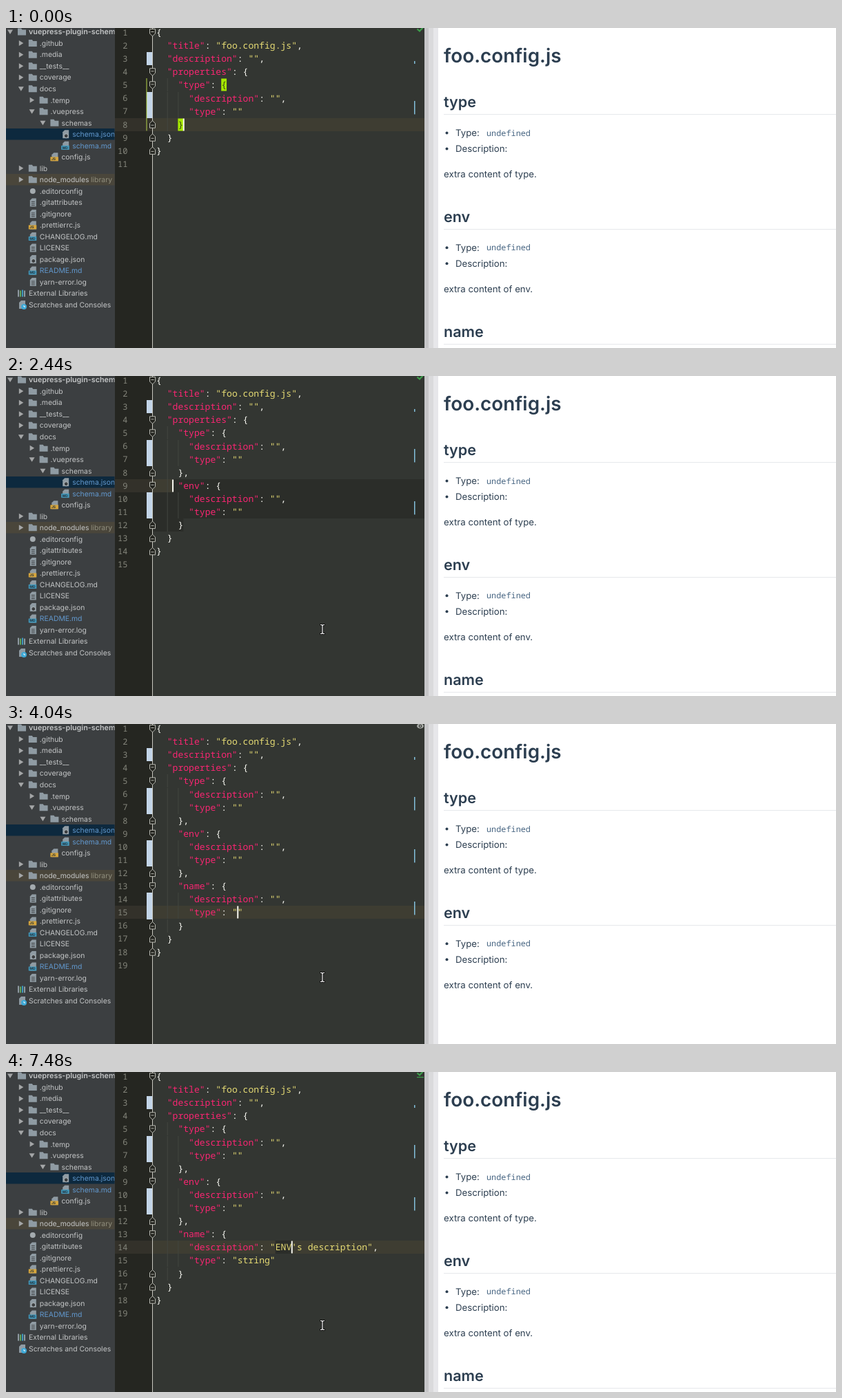
An HTML page for the animation above (8000 ms loop, 1204 by 465 pixels).

```html
<!DOCTYPE html>
<html lang="en">
<head>
<meta charset="utf-8">
<title>Schema editing</title>
<style>
html, body { margin: 0; width: 100%; height: 100%; overflow: hidden; background: #fff; }
svg { display: block; width: 1204px; height: 465px; }
text { white-space: pre; text-rendering: geometricPrecision; }
.tree { font: 10.4px Inter, sans-serif; fill: #c3c5c6; }
.root { font-size: 10.8px; font-weight: 600; }
.code { font: 13.08px "Noto Sans Mono", monospace; }
.num { font: 12px "Noto Sans Mono", monospace; fill: #85867c; text-anchor: end; }
.badge { font: 700 5px Inter, sans-serif; fill: #24323b; }
.page { font: 13.25px Inter, sans-serif; fill: #2c3e50; }
.page .h1 { font-size: 27.9px; font-weight: 600; }
.page .h2 { font-size: 21.6px; font-weight: 600; }
.page .mono { font: 11.85px "Noto Sans Mono", monospace; fill: #476582; }
</style>
</head>
<body>
<svg viewBox="0 0 1204 465">
  <defs>
    <clipPath id="side"><rect width="157.5" height="465"/></clipPath>
    <path id="foldOpen" d="M-4-5H4V1.5L0 5.5L-4 1.5ZM-2-1H2"/>
    <path id="foldClose" d="M-4 5H4V-1.5L0-5.5L-4-1.5ZM-2 1H2"/>
    <path id="beamPath" d="M-2.5-6.5Q0-6.5 0-5Q0-6.5 2.5-6.5M0-5V5M-2.5 6.5Q0 6.5 0 5Q0 6.5 2.5 6.5"/>
  </defs>
  <rect width="158" height="465" fill="#3c3f41"/>
  <g id="tree" class="tree" clip-path="url(#side)"></g>
  <rect x="158" width="54" height="465" fill="#252621"/>
  <rect x="212" width="395" height="465" fill="#333632"/>
  <g id="editor"></g>
  <rect x="607" width="6" height="465" fill="#c6c6c8"/>
  <rect x="613" width="7" height="465" fill="#dadadc"/>
  <rect x="620" width="7" height="465" fill="#e7e7ea"/>
  <g id="page" class="page"></g>
  <g id="pointer">
    <g id="beam" fill="none" stroke-linecap="square">
      <use href="#beamPath" stroke="#111" stroke-width="3"/>
      <use href="#beamPath" stroke="#fff" stroke-width="1.2"/>
    </g>
    <path id="arrow" d="M0 0V13L3 10.3L5 15L7.3 14L5.3 9.4H9.3Z" fill="#111" stroke="#fff"/>
  </g>
</svg>
<script>
const $ = id => document.getElementById(id);
const rect = (x, y, w, h, fill) => `<rect x="${x}" y="${y}" width="${w}" height="${h}" fill="${fill}"/>`;
const path = (d, stroke, width = 1, fill = 'none') =>
  `<path d="${d}" stroke="${stroke}" stroke-width="${width}" fill="${fill}"/>`;
const text = (x, y, str, cls = '', fill = '') =>
  `<text x="${x}" y="${y}" class="${cls}"${fill && ` style="fill:${fill}"`}>${str}</text>`;

// Project tree: depth, icon, label
const BLUE = '#6299cf';
const TREE = [
  [0, 'open', 'vuepress-plugin-schema'], [1, 'dir', '.github'], [1, 'dir', '.media'],
  [1, 'dir', '__tests__'], [1, 'dir', 'coverage'], [1, 'open', 'docs'], [2, 'dir', '.temp'],
  [2, 'open', '.vuepress'], [3, 'open', 'schemas'], [4, 'json', 'schema.json', BLUE],
  [4, 'md', 'schema.md', BLUE], [3, 'js', 'config.js'], [1, 'dir', 'lib'],
  [1, 'dir', 'node_modules'], [1, 'dot', '.editorconfig'], [1, 'file', '.gitattributes'],
  [1, 'file', '.gitignore'], [1, 'js', '.prettierrc.js'], [1, 'md', 'CHANGELOG.md'],
  [1, 'file', 'LICENSE'], [1, 'json', 'package.json'], [1, 'md', 'README.md', BLUE],
  [1, 'file', 'yarn-error.log'], [0, 'libs', 'External Libraries'],
  [0, 'scratch', 'Scratches and Consoles']
];

function treeIcon(kind, x, y) {
  const grey = '#8f9ba3';
  const sheet = path(`M${x + 5} ${y - 6}H${x + 11}V${y + 6}H${x + 2}V${y - 3}Z`, 'none', 0, grey);
  const lines = path(`M${x + 4} ${y - 1}H${x + 9}M${x + 4} ${y + 1.5}H${x + 9}M${x + 4} ${y + 4}H${x + 9}`, '#3c3f41');
  const badge = (label, fill) => sheet + rect(x, y, 11.5, 6, fill) + text(x + 1.5, y + 4.9, label, 'badge');
  switch (kind) {
    case 'dir':
    case 'open': return path(`M${x} ${y - 5}H${x + 5}L${x + 6.5} ${y - 3}H${x + 12}V${y + 5}H${x}Z`, 'none', 0, grey);
    case 'js': return badge('JS', '#d6a53c');
    case 'md': return badge('MD', '#4199bd');
    case 'json': return sheet + `<circle cx="${x + 7}" cy="${y + 2.5}" r="3" fill="#3c3f41" stroke="#b4bcc1"/>`;
    case 'dot': return `<circle cx="${x + 6}" cy="${y}" r="4" fill="#a4abaf"/>`;
    case 'libs': return [grey, '#62a65c', '#4199bd', grey]
      .map((c, i) => rect(x + i * 3, y - 5 + i % 2, 2, 10 - i % 2, c)).join('');
    case 'scratch': return sheet + `<circle cx="${x + 9}" cy="${y + 3}" r="4" fill="#3fa9d6"/>` +
      path(`M${x + 9} ${y + 1}V${y + 3}H${x + 11}`, '#fff');
    default: return sheet + lines;
  }
}

function drawTree() {
  let out = rect(0, 146, 158, 16.5, '#0d293e') + rect(0, 212, 158, 16.5, '#4a463b');
  TREE.forEach(([depth, kind, label, fill], i) => {
    const x = 17 + depth * 15.8, y = 5.6 + i * 16.52;
    if (kind === 'open') out += path(`M${x - 15} ${y - 3}h8l-4 6.5Z`, 'none', 0, '#a4a6a7');
    if (kind === 'dir') out += path(`M${x - 14} ${y - 4}v8l6.5-4Z`, 'none', 0, '#a4a6a7');
    out += treeIcon(kind, x, y) + text(x + 16, y + 3.8, label, i ? '' : 'root', fill);
  });
  return out + text(123, 224.2, 'library', '', '#918f7e');
}

function drawPage(named) {
  let out = text(635, 50, 'foo.config.js', 'h1');
  ['type', 'env', 'name'].slice(0, named ? 3 : 2).forEach((name, i) => {
    const y = i * 166.8;
    out += text(635, 115 + y, name, 'h2') + rect(635, Math.round(125 + y), 569, 1, '#e6e8eb');
    ['Type:', 'Description:'].forEach((label, j) => {
      out += `<circle cx="639.5" cy="${152.5 + y + j * 23}" r="2"/>` + text(652, 157 + y + j * 23, label);
    });
    out += text(697, 156.5 + y, 'undefined', 'mono') + text(635, 217 + y, `extra content of ${name}.`);
  });
  return out;
}

// Document builders
const block = (name, desc = '', type = '') =>
  [`    "${name}": {`, `      "description": "${desc}",`, `      "type": "${type}"`, '    }'];
const doc = (...body) => ['{', '  "title": "foo.config.js",', '  "description": "",', '  "properties": {',
  ...body.flat(), '  }', '}', ''];
const comma = lines => [...lines.slice(0, -1), lines.at(-1) + ','];
const TYPE = block('type'), ENV = block('env');
const one = doc(TYPE), two = doc(comma(TYPE), ENV);
const third = (desc, type) => doc(comma(TYPE), comma(ENV), block('name', desc, type));
const empty = third(), typed = third('', 'string'), full = third("ENV's description", 'string');

const STEPS = [
  { at: 0, lines: one, caret: [8, 5], pair: [5, 12, 8, 4], mark: 'ok', named: true },
  { at: 630, blink: true },
  { at: 1070, caret: [11, 0], pair: null, blink: false },
  { at: 1450, caret: [8, 5], pair: [5, 12, 8, 4] },
  { at: 1810, lines: doc(comma(TYPE)), caret: [8, 6], pair: null, mark: 'eye' },
  { at: 1900, lines: doc(comma(TYPE), '    '), caret: [9, 4] },
  { at: 2140, lines: doc(comma(TYPE), '   '), caret: [9, 3] },
  { at: 2230, lines: two, sel: [9, 3, 12, 5], unfolded: 9 },
  { at: 2440, mark: 'ok', unfolded: 0 },
  { at: 3270, caret: [12, 5], sel: null, pair: [9, 11, 12, 4] },
  { at: 3390, lines: doc(comma(TYPE), comma(ENV)), caret: [12, 6], pair: null, named: false },
  { at: 3600, lines: doc(comma(TYPE), comma(ENV), '    '), caret: [13, 4], mark: 'error' },
  { at: 3800, lines: empty, caret: [13, 3], sel: [13, 3, 16, 5], mark: 'eye', unfolded: 13 },
  { at: 3920, caret: [15, 15], sel: null },
  { at: 4040, unfolded: 0 },
  { at: 4160, mark: 'ok' },
  { at: 4430, lines: typed, caret: [15, 21], sel: [15, 15, 15, 21], mark: 'eye', stale: 15 },
  { at: 4550, stale: 0 },
  { at: 4790, mark: 'ok' },
  { at: 5840, blink: true },
  { at: 6140, caret: [14, 22], sel: null, blink: false },
  { at: 6440, lines: third('description', 'string'), mark: 'eye' },
  { at: 6710, lines: third('s description', 'string') },
  { at: 6820, lines: third("'s description", 'string') },
  { at: 7120, lines: full, caret: [14, 25], sel: [14, 22, 14, 25], stale: 14 },
  { at: 7240, stale: 0, named: true },
  { at: 7480, mark: 'done' }
];
// Each step inherits what it does not change
for (let i = 1; i < STEPS.length; i++) STEPS[i] = { ...STEPS[i - 1], ...STEPS[i] };

const CW = 7.85, LH = 19.1;
const colX = col => 218 + col * CW;
const rowY = row => 6.5 + (row - 1) * LH;
const topY = row => Math.round(rowY(row) - 9.5);
const isChanged = line => /description": "(?!ENV)|type": ""|^ +$/.test(line);

function drawLine(line, row) {
  const out = [];
  for (const m of line.matchAll(/"[^"]*"(:)?|[^\s"]/g)) {
    const str = m[1] ? m[0].slice(0, -1) : m[0];
    const fill = m[1] ? '#f92672' : str[0] === '"' ? '#e6db74' : '#f8f8f2';
    out.push(text(colX(m.index), rowY(row) + 4.5, str, 'code', fill));
    if (m[1]) out.push(text(colX(m.index + str.length), rowY(row) + 4.5, ':', 'code', '#f8f8f2'));
  }
  return out.join('');
}

function drawMark(mark) {
  if (mark === 'eye') return `<ellipse cx="601" cy="3" rx="5" ry="3.5" fill="#a9aca8"/>
    <circle cx="601" cy="3" r="2.3" fill="#333632"/><circle cx="601" cy="3" r="1" fill="#ccc"/>`;
  if (mark === 'error') return '<circle cx="601" cy="2.5" r="5" fill="#e6194f"/>' +
    rect(600.4, -1, 1.2, 4, '#fff') + rect(600.4, 4, 1.2, 1.2, '#fff') +
    rect(595, 220.5, 12, 1.5, '#f0245f') + path('M258 224l2-1.5l2 1.5l2-1.5l2 1.5', '#f0245f');
  return path('M596.5 1.5L600 4.5L606-2', '#3d9f4b', 2.2) +
    (mark === 'done' ? rect(596, 7, 10, 1.2, '#3d9f4b') : '');
}

function drawEditor({ lines, caret, pair, sel, mark, blink, unfolded, stale }) {
  const [row, col] = caret;
  let out = rect(158, topY(row), 54, 19, '#33312a') + rect(213, topY(row), 394, 19, '#3e3d32');
  if (sel) {
    const [r1, c1, r2, c2] = sel;
    for (let r = r1; r <= r2; r++) {
      const x = r === r1 ? colX(c1) : 213;
      out += rect(x, topY(r), (r === r2 ? colX(c2) : 607) - x, topY(r + 1) - topY(r), '#2b2d29');
    }
  }
  out += rect(212, 0, 1, 465, '#c9c9c0');
  let run = 0, folds = '';
  lines.forEach((line, i) => {
    const n = i + 1, y = rowY(n), indent = line.search(/\S|$/);
    for (let c = 2; c < indent; c += 2) out += rect(colX(c), topY(n), 1, LH, '#434640');
    out += text(176.5, y + 4.3, n, 'num') + drawLine(line, n);
    if (isChanged(line) || n === stale) {
      run++;
    } else if (run) {
      const top = topY(n - run);
      out += rect(204, top, 8, topY(n) - top, '#c3d5e8') +
        rect(592, top + 13, 1.5, 4 + (run - 1) * 15.4, '#84c0dc');
      run = 0;
    }
    const hidden = unfolded && (n === unfolded || n === unfolded + 3);
    const end = line.trim()[0] === '}';
    if (!hidden && (end || line.endsWith('{')))
      folds += `<use href="#fold${end ? 'Close' : 'Open'}" x="212.5" y="${y}"/>`;
  });
  out += `<g fill="#252621" stroke="#b9bab2">${folds}</g>`;
  if (pair) {
    const [r1, c1, r2, c2] = pair;
    out += rect(203.5, topY(r1), 1, (r2 - r1 + 1) * LH, '#b5d34a');
    [[r1, c1, '{'], [r2, c2, '}']].forEach(([r, c, ch]) => {
      out += rect(colX(c), topY(r) + .5, CW, 18, '#a6e800') + text(colX(c), rowY(r) + 4.5, ch, 'code', '#3b4a17');
    });
  }
  if (!blink) out += rect(colX(col) - .5, topY(row) + .5, 2, 18, '#f8f8f0');
  return out + drawMark(mark);
}

function movePointer(t) {
  const p = Math.min(7, Math.floor((t - 270) / 88.5)) / 7;
  const k = 1 - (1 - p) ** 2;
  const x = 858 - 399 * k, y = 438 - 70 * k;
  $('pointer').setAttribute('transform', `translate(${x} ${y})`);
  $('pointer').style.display = t < 270 ? 'none' : '';
  $('beam').style.display = x < 607 ? '' : 'none';
  $('arrow').style.display = x < 607 ? 'none' : '';
}

let shown = -1;
function frame(now) {
  const t = now % 8000;
  const index = STEPS.findLastIndex(s => s.at <= t);
  if (index !== shown) {
    shown = index;
    $('editor').innerHTML = drawEditor(STEPS[index]);
    $('page').innerHTML = drawPage(STEPS[index].named);
  }
  movePointer(t);
  requestAnimationFrame(() => frame(performance.now() - start));
}

$('tree').innerHTML = drawTree();
const start = performance.now();
frame(0);
</script>
</body>
</html>
```
